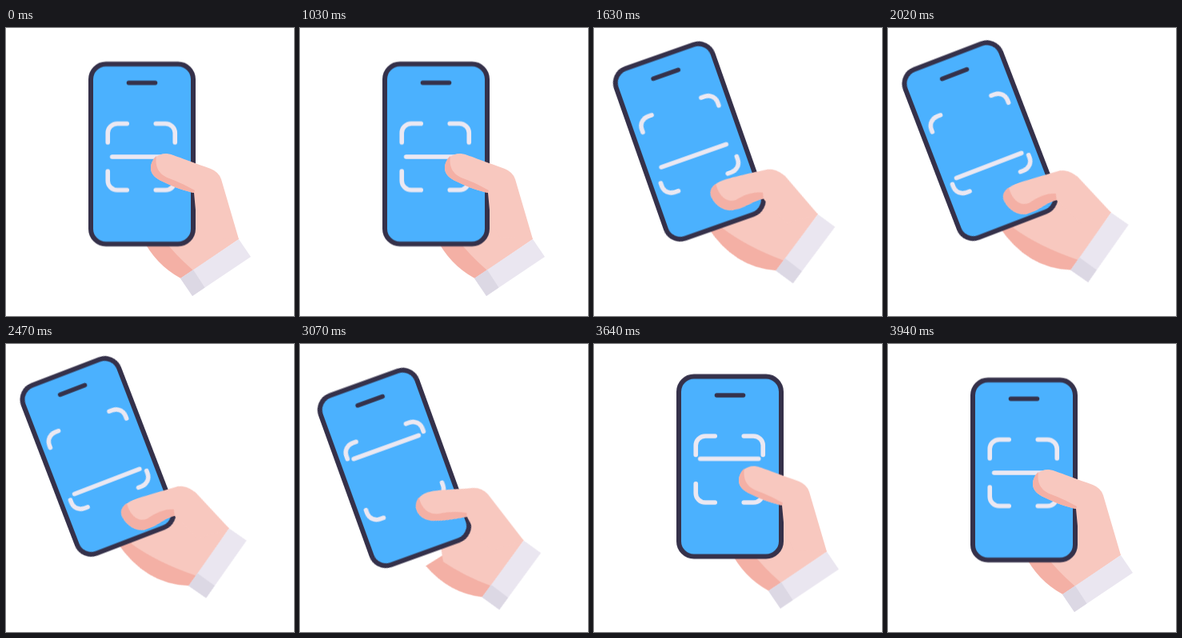
Recreate the animation shown at these times as an HTML page without scripts. Size 360 px wide and 360 px high, loop 3970 ms.

```html
<!DOCTYPE html>
<html lang="en">
<head>
<meta charset="utf-8">
<title>Scanning with a phone</title>
<style>
  html, body { margin: 0; width: 100%; height: 100%; overflow: hidden; background: #fff; }
  svg { display: block; width: 100vw; height: 100vh; }

  :root { --loop: 3970ms cubic-bezier(.37, 0, .63, 1) infinite both; }

  .bob { animation: bob var(--loop); }
  .phone { animation: phone var(--loop); }
  .hand { animation: hand var(--loop); }
  .scan { animation: scan var(--loop); }
  .spread { d: var(--a); animation: spread var(--loop); }
  .flex { d: var(--a); animation: flex var(--loop); }

  .skin { fill: #f8c8bf; }
  .shade { fill: #f4b0a5; }
  .mark { fill: none; stroke: #ebe8f2; stroke-width: 5.6; stroke-linecap: round; }
  .corner {
    --a: path("M-42 -18L-42 -30C-42 -36 -37 -41.5 -30 -41.5L-18 -41.5");
    --b: path("M-51 -35L-51 -38C-51 -46 -45 -51 -38 -51L-34 -51");
  }
  .bar { --a: path("M-36.5 0L36.5 0"); --b: path("M-43.5 0L43.5 0"); }
  .fingers {
    --a: path("M170 262Q187 296 218.5 313L234 303L230 240Z");
    --b: path("M154 230Q168 292 218.5 313L234 303L225 235Z");
  }
  .palm {
    --a: path("M195 262Q212 284 234 303L291 264L250 200L200 200Z");
    --b: path("M170 238Q192 272 232 305L291 264L250 205L190 215Z");
  }
  .thumb {
    --a: path("M181 175C181 165 189 157 200 157C206 157 214 161 256 176Q266 180 269 189L291 264L250 262L238 238L235 206C225 204 212 200 196 192C187 188 181 183 181 175Z");
    --b: path("M171.5 201C171.5 193 180 188 192 188C205 188 222 190 250 192Q260 194 268 207L291 264L250 262L240 240L233 225C222 223 209 229 194 228C180 227 171.5 212 171.5 201Z");
  }
  .under {
    --a: path("M188 160C186 172 190 183 204 188C212 191 222 195 236 203L235 206C225 204 212 200 196 192C187 188 181 183 181 175C181 169 184 163 188 160Z");
    --b: path("M183 189C181 201 186 217 200 216C212 213 224 212 235 217L233 225C222 223 209 229 194 228C180 227 171.5 212 171.5 201C171.5 195 176 190 183 189Z");
  }

  @keyframes bob {
    0%, 25.7%, 55.4%, 66.75%, 99.2%, 100% { transform: translateY(0); }
    34.8% { transform: translateY(-8px); }
    42.8% { transform: translateY(1px); }
    80.1% { transform: translateY(15px); }
    93.2% { transform: translateY(-5px); }
  }
  @keyframes phone {
    0%, 25.7% { transform: translate(170px, 157.5px) rotate(0deg); animation-timing-function: cubic-bezier(.4, 0, .1, 1); }
    49.9%, 74.06% { transform: translate(115px, 140.5px) rotate(-21deg); animation-timing-function: cubic-bezier(.65, 0, .35, 1); }
    88.9%, 100% { transform: translate(170px, 157.5px) rotate(0deg); }
  }
  @keyframes hand {
    0%, 25.7% { transform: translate(262px, 299.5px) rotate(0deg) translate(-262px, -299.5px); animation-timing-function: cubic-bezier(.4, 0, .1, 1); }
    49.9%, 74.06% { transform: translate(264.5px, 274px) rotate(-21deg) translate(-262px, -299.5px); animation-timing-function: cubic-bezier(.65, 0, .35, 1); }
    88.9%, 100% { transform: translate(262px, 299.5px) rotate(0deg) translate(-262px, -299.5px); }
  }
  @keyframes spread {
    0%, 25.7% { d: var(--a); animation-timing-function: cubic-bezier(.4, 0, .1, 1); }
    49.9%, 74.06% { d: var(--b); animation-timing-function: cubic-bezier(.65, 0, .35, 1); }
    88.9%, 100% { d: var(--a); }
  }
  @keyframes flex {
    0%, 25.7% { d: var(--a); animation-timing-function: cubic-bezier(.45, 0, .2, 1); }
    50.4%, 65.5% { d: var(--b); }
    84.4%, 100% { d: var(--a); }
  }
  @keyframes scan {
    0%, 25.7%, 99.2%, 100% { transform: translateY(0); }
    58.7% { transform: translateY(34px); }
    81.1% { transform: translateY(-36px); }
  }
</style>
</head>
<body>
<svg viewBox="0 0 360 360">
  <g class="bob">
    <g class="hand">
      <path class="flex fingers shade"/>
      <path class="flex palm skin"/>
      <path d="M291 264L306 286L233 335L218 313Z" fill="#eae6f0"/>
      <path d="M234 302.3L248.5 324.6L233 335L218 313Z" fill="#dcd8e4"/>
    </g>
    <g class="phone">
      <rect x="-64" y="-112.5" width="128" height="225" rx="19" fill="#4bb1fe" stroke="#35314a" stroke-width="6"/>
      <path d="M-16.5 -89H16.5" stroke="#35314a" stroke-width="5.6" stroke-linecap="round"/>
      <g class="mark" transform="translate(-.75 3.5)">
        <path class="spread corner"/>
        <path class="spread corner" transform="scale(-1 1)"/>
        <path class="spread corner" transform="scale(1 -1)"/>
        <path class="spread corner" transform="scale(-1 -1)"/>
        <g class="scan"><path class="spread bar"/></g>
      </g>
    </g>
    <g class="hand">
      <path class="flex thumb skin"/>
      <path class="flex under shade"/>
    </g>
  </g>
</svg>
</body>
</html>
```
